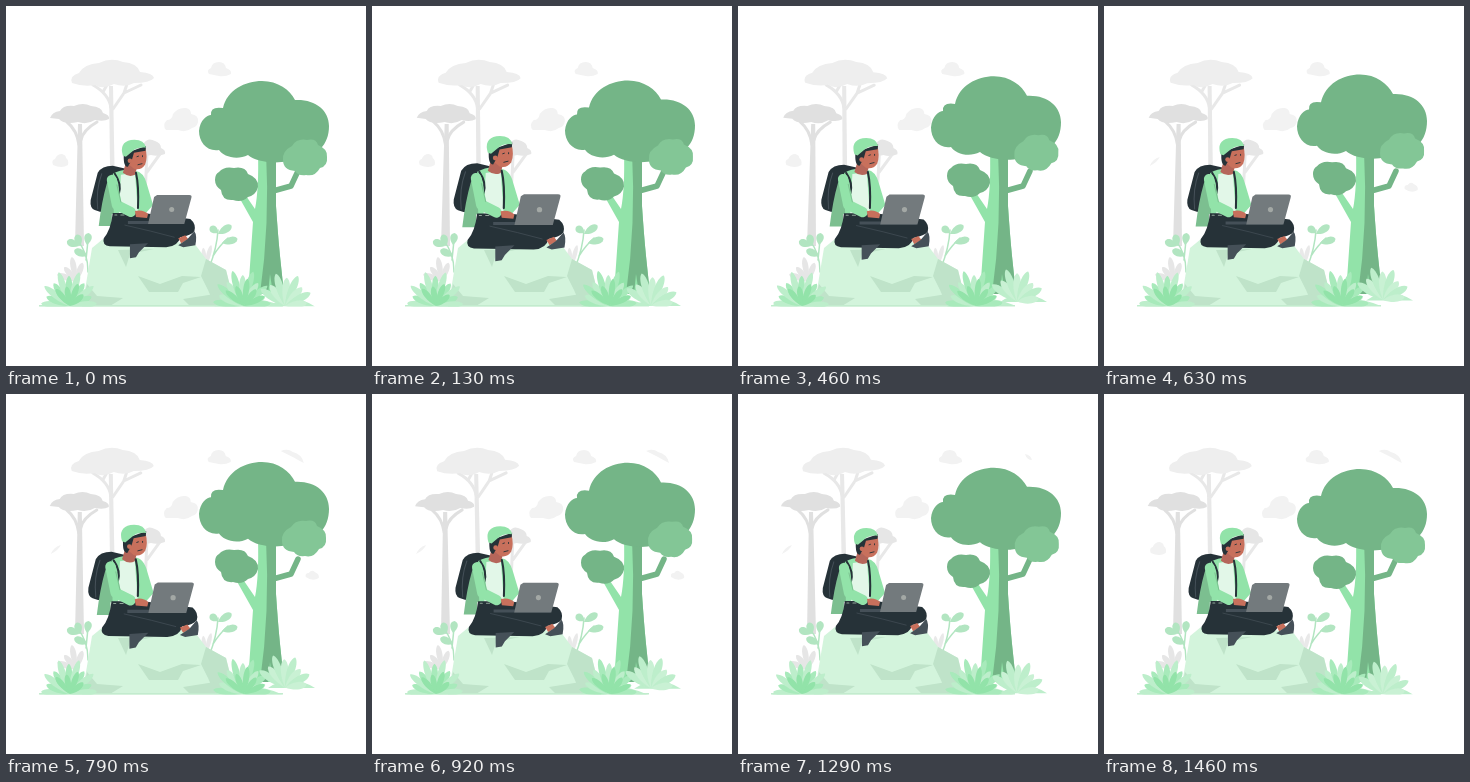
An HTML page that plays this animation: 360 px wide and 360 px high, repeating every 1.5 s.

```html
<!DOCTYPE html>
<html lang="en">
<head>
<meta charset="utf-8">
<title>Working outdoors</title>
<style>
  html, body { margin: 0; width: 100%; height: 100%; overflow: hidden; background: #fff; }
  svg { display: block; width: 100vw; height: 100vh; }
  .line { fill: none; stroke-linecap: round; stroke-linejoin: round; }
</style>
</head>
<body>
<svg viewBox="0 0 360 360">
  <clipPath id="aboveGround"><path d="M0 0H360V300.500H0Z"/></clipPath>

  <g id="clouds" fill="#f2f2f2">
    <path d="M203 68Q200 64 205 62Q206 56 213 56Q219 56 220 62Q226 64 225 68Q219 71 213 70Z"/>
    <path d="M160 124Q156 119 161 114Q166 114 167 108Q172 101 180 102Q185 103 185 108Q193 109 192 116Q191 121 186 122Q180 127 172 124Z"/>
    <path id="cloudLeft" d="M47 159Q45 154 49 153Q51 148 56 148Q60 149 60 152Q63 154 62 159Q56 163 47 159Z"/>
    <path id="cloudLeftEdge" d="M45 160Q48 153 55 151Q53 156 45 160Z"/>
    <path id="cloudTop" d="M275 57Q282 54 287 58Q296 60 298 69Q292 66 287 63Z"/>
    <path id="cloudTopEnd" d="M288 60Q294 61 295 66Q290 66 288 60Z"/>
    <path id="cloudRight" d="M300 183Q299 179 303 179Q306 175 309 178Q314 180 313 184Q307 188 300 183Z"/>
  </g>

  <g id="tallTree">
    <path fill="#e8e8e8" d="M103 80H107L110 240H105Z"/>
    <path class="line" stroke="#e8e8e8" stroke-width="3" d="M105 102Q103 88 87 79M107 103L118 87L135 79M118 87L121 78M97 86L102 77"/>
    <path fill="#eee" d="M66 77Q63 70 73 67Q78 58 93 57Q105 51 117 56Q131 57 134 66Q147 67 148 72Q144 77 128 77Q119 82 108 78Q97 84 89 79Q77 81 66 77Z"/>
  </g>
  <g id="wideTree">
    <path fill="#e0e0e0" d="M72 118H76L78 240H69Z"/>
    <path class="line" stroke="#e0e0e0" stroke-width="3" d="M73 139Q71 124 61 116M75 134Q77 124 91 116"/>
    <path fill="#e0e0e0" d="M44 112Q46 106 54 105Q57 99 68 100Q77 96 85 100Q96 101 97 107Q104 109 103 113Q98 116 89 114Q81 119 72 116Q58 119 53 113Z"/>
  </g>
  <g id="smallTree">
    <path class="line" stroke="#e8e8e8" stroke-width="3" d="M139 190L141 147M141 166L154 148"/>
    <path fill="#e6e6e6" d="M129 146Q131 137 138 137Q142 131 149 135Q155 137 155 142Q160 144 159 148Q152 151 145 149Q137 151 129 146Z"/>
  </g>

  <path class="line" stroke="#74b587" stroke-width="5.500" d="M267 185L285 180L292 165"/>
  <path fill="#92e3a9" d="M252 145H270L270 200Q272 230 274 250L278 288H242L247 216L229 184L236 184L249 203Q253 183 252 145Z"/>
  <path fill="#74b587" d="M260 145H270L270 200Q272 230 274 250L278 288H254Q264 218 260 145Z"/>
  <path fill="#92e3a9" d="M264 268L267 288H262Z"/>

  <path id="crown" fill="#74b587" d="M217 102C221 84 239 75 256 75C272 75 284 84 289 94C309 93 323 104 323 120C323 139 311 151 291 151C281 159 252 158 242 149C230 155 217 150 213 144C201 146 193 136 193 125C194 114 201 109 205 109Q204 100 217 102Z"/>
  <path id="bushRight" fill="#83c696" d="M286 140Q291 132 301 134Q310 132 312 139Q322 143 321 151Q322 160 314 162Q309 171 300 169Q292 170 289 165Q277 164 277 154Q276 145 286 140Z"/>
  <path id="bushLeft" fill="#74b587" d="M213 166Q218 160 228 162Q239 160 242 168Q253 172 252 181Q250 189 242 191Q236 197 227 194Q216 195 215 184Q209 180 209 174Q209 168 213 166Z"/>

  <g id="grey"></g>
  <g id="sprigs" fill="#b2e5c1"></g>

  <path fill="#d3f4dc" d="M76 300.500L80 278L86 242L97 233L188 237L200 253L220 264L229 300.500Z"/>
  <g fill="#bfe3c9">
    <path d="M200 253L220 264L229 300H209L202 284L195 270Z"/>
    <path d="M132 270L154 278L176 270L195 271L177 277L172 286L143 286Z"/>
    <path d="M76 300L81 278L91 290L117 292L104 300ZM177 293L209 288L218 300H184ZM112 244L148 243L124 248L120 261Z"/>
  </g>
  <path fill="#c3ebce" d="M33 299H277V300.500H33Z"/>

  <g id="person">
    <path fill="#263238" d="M92 167Q96 160 107 160L120 163L112 205Q97 208 89 204Q84 202 85 194Z"/>
    <path class="line" stroke="#455058" stroke-width="1" d="M96 168Q90 184 92 203"/>
    <path fill="#7cbf90" d="M106 169L113 208H106V220H93Q96 195 101 178Z"/>
    <path fill="#92e3a9" d="M107 168Q118 162 129 165Q138 166 141 179L147 199L139 208H108Z"/>
    <path fill="#e2f7e8" d="M115 169L129 167L132 208H113Z"/>
    <path fill="#b5665a" d="M120 157L131 162L129 169Q123 172 117 167Z"/>
    <path class="line" stroke="#263238" stroke-width="2" d="M130 167Q133 180 132 202M109 168Q116 178 113 188"/>
    <path fill="#c8705c" d="M122 148L139 141Q142 152 139 159Q135 165 128 163L122 158Z"/>
    <path fill="#263238" d="M118 148L140 140.500L139.500 145L128 147L126 154L122 161Q117 161 118 148Z"/>
    <circle cx="124" cy="155" r="2.300" fill="#c8705c"/>
    <path class="line" stroke="#263238" stroke-width=".9" d="M131 151L132.500 150.500M136.500 150V151M132 159L136 158"/>
    <path fill="#92e3a9" d="M117 150Q113 137 125 134.500Q138 133 140 142Q131 141 126 146L120 151Z"/>
    <path fill="#263238" d="M107 207H137L184 213Q190 218 188 225Q185 229 174 231Q172 240 160 241L104 240Q96 239 98 232Q105 224 107 207Z"/>
    <path class="line" stroke="#455058" stroke-width=".7" d="M119 219Q146 225 168 231"/>
    <path class="line" stroke="#92a59a" stroke-width="1" d="M109 209H111M115 209H118"/>
    <path fill="#c8705c" d="M172 232L179 229L182 233L175 237Z"/>
    <path fill="#455058" d="M124 238L142 237L133 246L130 251L124 252ZM172 239L181 233L188 225Q191 229 189 239L177 241Z"/>
    <path class="line" stroke="#92e3a9" stroke-width="10" d="M106 174L111 199L125 206"/>
    <path class="line" stroke="#74b587" stroke-width=".7" d="M111 179L115 196"/>
    <path fill="#c8705c" d="M129 205Q137 203 142 208L141 212L130 211Z"/>
    <path fill="#455058" d="M122 215H177V218H122Z"/>
    <path fill="#737a7d" d="M151 189H183Q186 189 185 192L178 218H142L148 191Z"/>
    <circle cx="165.500" cy="203.500" r="2.500" fill="#a3a8a5"/>
  </g>

  <g clip-path="url(#aboveGround)">
    <g id="plantLeft"></g>
    <g id="plantMid"></g>
    <g id="plantRight"></g>
  </g>
</svg>
<script>
const LOOP = 1500;
const $ = id => document.getElementById(id);
const move = (id, value) => $(id).setAttribute('transform', value);
const show = (id, on) => $(id).setAttribute('visibility', on ? 'visible' : 'hidden');

const leaf = (x, y, angle, length, width, fill) =>
  `<path transform="translate(${x} ${y}) rotate(${angle})" ${fill ? `fill="${fill}"` : ''}
    d="M0 0C${-width} ${-length * .4} ${-width} ${-length * .9} 0 ${-length}C${width} ${-length * .9} ${width} ${-length * .4} 0 0Z"/>`;

// Leaves spread evenly between two angles, alternating in length and tint
function fan(id, x, y, from, to, count, length, width, tints) {
  let out = '';
  for (let i = 0; i < count; i++) {
    const angle = from + (to - from) * i / (count - 1);
    const reach = length * (1 - Math.abs(angle) / 350) * (i % 2 ? .82 : 1);
    out += leaf(x, y, angle, reach, width, tints[i % tints.length]);
  }
  $(id).innerHTML += out;
}

const mound = (id, left, right) => {
  $(id).innerHTML = `<path fill="#bdeecb" d="M${left} 300.5Q${(left + right) / 2} 285 ${right} 300.5Z"/>`;
};

fan('grey', 70, 275, -70, 20, 4, 25, 4, ['#e6e6e6']);
fan('grey', 199, 262, -25, 15, 3, 25, 3, ['#e9e9e9']);
$('sprigs').innerHTML =
  '<path class="line" stroke="#b2e5c1" stroke-width="1.5" d="M203 262Q211 242 212 224M207 250Q214 239 222 232M82 266Q82 246 71 234M80 254L82 234"/>' +
  [[212, 227, -52, 10], [212, 228, 58, 16], [216, 237, 75, 16], [73, 240, -68, 13],
   [74, 240, -15, 12], [81, 239, 8, 12], [81, 250, -65, 14]]
    .map(([x, y, a, l]) => leaf(x, y, a, l, 5)).join('');

mound('plantLeft', 33, 88);
fan('plantLeft', 63, 300, -85, 85, 11, 37, 4.5, ['#bdeecb', '#a8eabb']);
fan('plantLeft', 64, 300, -40, 50, 4, 25, 4, ['#92e3a9']);
mound('plantMid', 208, 277);
fan('plantMid', 236, 300, -82, 85, 11, 38, 4.5, ['#a8eabb', '#bdeecb']);
fan('plantMid', 238, 300, -50, 65, 5, 28, 4, ['#92e3a9']);
mound('plantRight', 262, 309);
fan('plantRight', 279, 300, -55, 82, 8, 35, 5, ['#bdeecb', '#c9f1d4']);

// Pulse of the seated figure: [time, amount]
const pulse = [[0, .1], [130, 1], [330, .5], [630, .5], [790, .8], [1080, 0], [1460, .1], [LOOP, .1]];
function sample(keys, t) {
  const i = keys.findIndex(([time]) => time > t);
  const [t0, a] = keys[i - 1], [t1, b] = keys[i];
  const u = (t - t0) / (t1 - t0);
  return a + (b - a) * u * u * (3 - 2 * u);
}

function draw(t) {
  const phase = 2 * Math.PI * t / LOOP;
  const sway = Math.sin(phase), lift = (1 - Math.cos(phase)) / 2;

  move('crown', `translate(0 ${157 - 4 * lift}) scale(1 ${1 + .037 * lift}) translate(0 -157)`);
  move('bushRight', `translate(${-lift} ${-7 * lift})`);
  move('bushLeft', `translate(0 ${-6 * lift})`);

  move('tallTree', `rotate(${.45 * sway} 107 240)`);
  move('wideTree', `rotate(${.6 * sway} 73 240)`);
  move('smallTree', `rotate(${.5 * sway} 140 195)`);
  move('clouds', `translate(${1.4 * sway} 0)`);
  show('cloudLeft', t < 560 || t > 1300);
  show('cloudLeftEdge', t >= 560 && t <= 1300);
  show('cloudTop', t > 700 && t < 1000 || t > 1300);
  show('cloudTopEnd', t >= 1000 && t <= 1300);
  show('cloudRight', t > 560 && t < 1200);

  const size = 1 + .065 * sample(pulse, t);
  move('person', `translate(135 201) scale(${size}) translate(-135 -201)`);

  move('plantLeft', `rotate(${1.5 * sway} 63 300)`);
  move('plantMid', `rotate(${-1.5 * sway} 236 300)`);
  move('plantRight', `translate(279 ${300 - 6.5 * lift}) skewX(${5 * lift}) translate(-279 -300)`);
}

const start = performance.now();
function frame(now) {
  draw(Math.max(0, now - start) % LOOP);
  requestAnimationFrame(frame);
}
draw(0);
requestAnimationFrame(frame);
</script>
</body>
</html>
```
